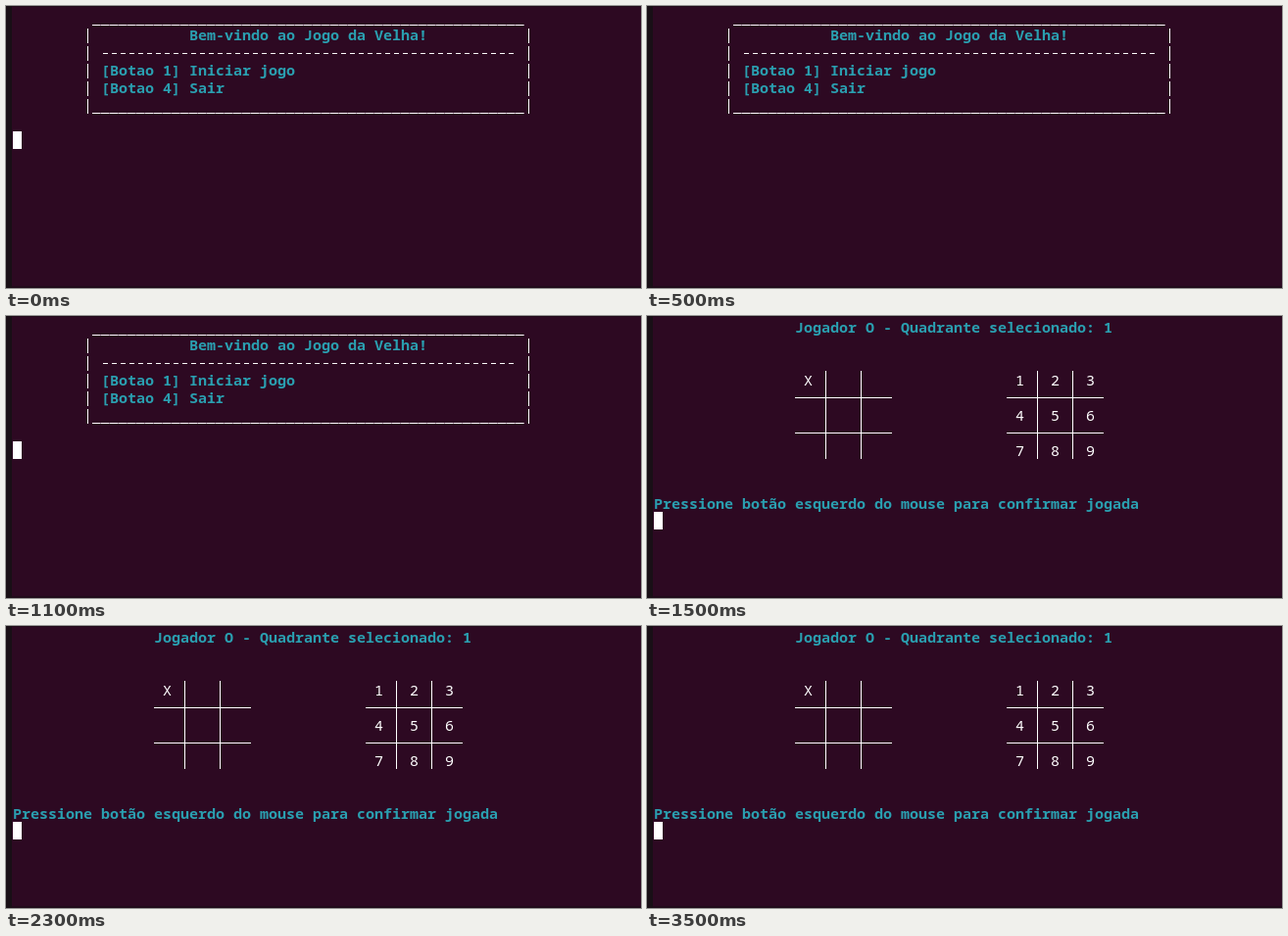
Recreate the animation shown at these times as an HTML page with a canvas. Size 648 by 288 pixels, loop 3600 ms.

```html
<!DOCTYPE html>
<html lang="pt">
<head>
<meta charset="utf-8">
<title>Jogo da Velha</title>
<style>
html, body { margin: 0; width: 100%; height: 100%; overflow: hidden; background: #2d0922; }
canvas { display: block; }
</style>
</head>
<body>
<canvas id="stage" width="648" height="288"></canvas>
<script>
const LOOP = 3600, MENU_END = 1500, BLINK = 600, FIRST_BLINK = 500;
const CELL_W = 9, CELL_H = 18;
const CYAN = '#2a9fb0', WHITE = '#fff';
const ctx = document.getElementById('stage').getContext('2d');

const colX = col => 7 + col * CELL_W;
const rowY = row => 2 + row * CELL_H;

function rect(x, y, w, h, color = WHITE) {
  ctx.fillStyle = color;
  ctx.fillRect(x, y, w, h);
}

function text(col, row, str, color = CYAN, weight = 'bold') {
  ctx.font = `${weight} 15px "Noto Sans Mono", "DejaVu Sans Mono", monospace`;
  ctx.fillStyle = color;
  [...str].forEach((ch, i) => ctx.fillText(ch, colX(col + i), rowY(row) + 15));
}

function underscores(row) {
  for (let col = 9; col < 58; col++) rect(colX(col), rowY(row) + 17, 8.7, 1);
}

function menu() {
  underscores(0);
  underscores(5);
  for (let row = 1; row <= 5; row++) {
    for (const col of [8, 58]) rect(colX(col) + 4, rowY(row) + 3, 1, 15);
  }
  for (let col = 10; col < 57; col++) rect(colX(col) + 2, rowY(2) + 10, 5, 1);
  text(20, 1, 'Bem-vindo ao Jogo da Velha!');
  text(10, 3, '[Botao 1] Iniciar jogo');
  text(10, 4, '[Botao 4] Sair');
}

function board(col, marks) {
  const x = colX(col), y = rowY(3);
  for (const i of [0, 1]) {
    rect(x + 31 + i * 36, y, 1, 90);
    rect(x, y + 27 + i * 36, 99, 1);
  }
  [...marks].forEach((mark, i) =>
    text(col + 1 + (i % 3) * 4, 3 + Math.floor(i / 3) * 2, mark, WHITE, 'normal'));
}

function game() {
  text(16, 0, 'Jogador O - Quadrante selecionado: 1');
  board(16, 'X');
  board(40, '123456789');
  text(0, 10, 'Pressione botão esquerdo do mouse para confirmar jogada');
}

function draw(now) {
  const t = now % LOOP;
  const inMenu = t < MENU_END;
  rect(0, 0, 648, 288, '#2d0922');
  rect(0, 0, 648, 1, '#220a1b');
  rect(0, 286, 648, 2, '#210b1b');
  rect(0, 0, 6, 288, '#190f16');
  if (inMenu) menu(); else game();

  const cursorOn = Math.floor((t - FIRST_BLINK) / BLINK) % 2 !== 0;
  if (cursorOn) rect(colX(0), rowY(inMenu ? 7 : 11), CELL_W, CELL_H);
}

const start = performance.now();
function tick() {
  draw(performance.now() - start);
  requestAnimationFrame(tick);
}
tick();
</script>
</body>
</html>
```
